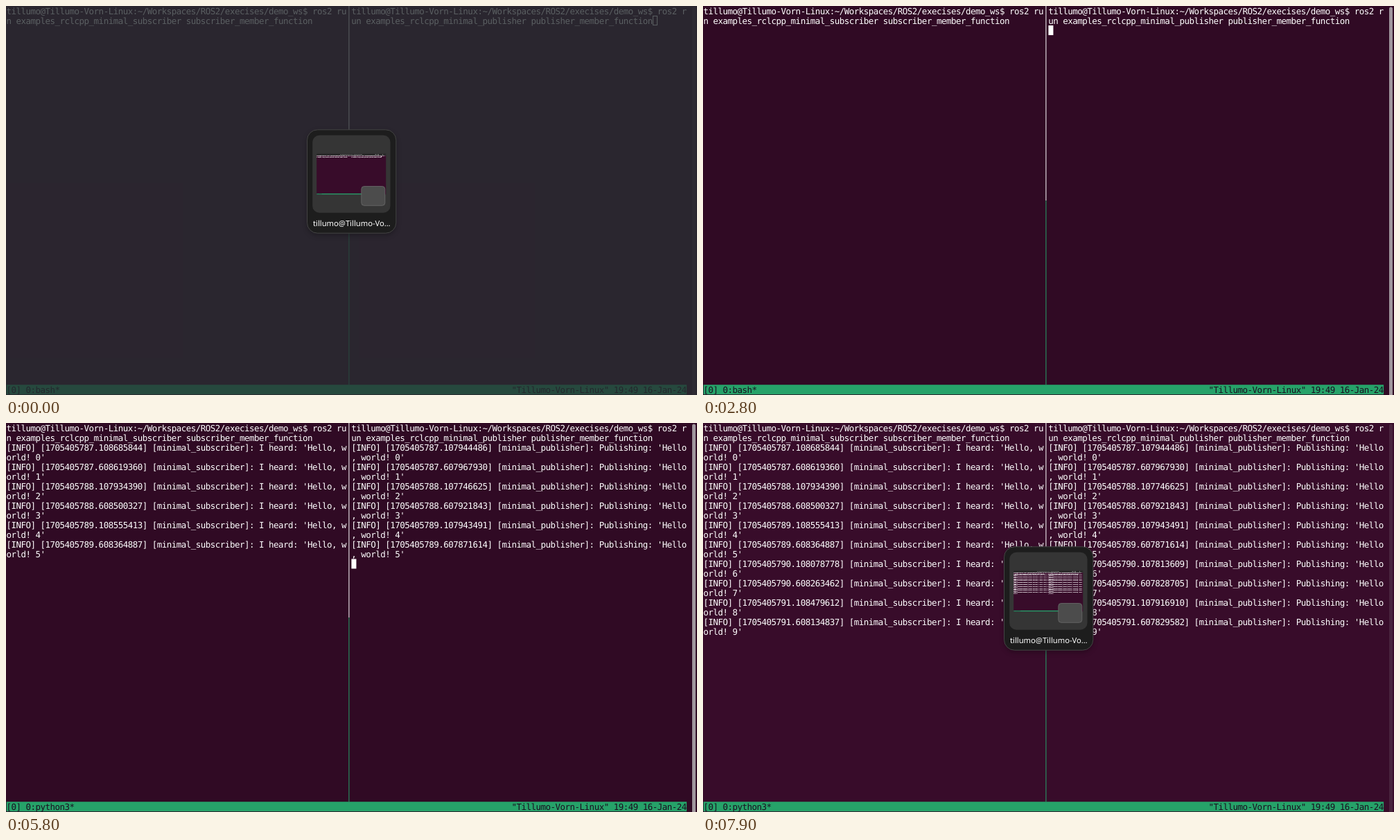
Write an HTML page that moves like this. It is 997 by 562 pixels and loops after 8000 ms.

```html
<!DOCTYPE html>
<html lang="en">
<head>
<meta charset="utf-8">
<title>Terminal publisher and subscriber</title>
<style>
html, body { margin: 0; width: 100%; height: 100%; overflow: hidden; background: #300a24; }
svg { display: block; width: 997px; height: 562px; }
text { white-space: pre; text-rendering: geometricPrecision; }
#term text { font: 12.5px "DejaVu Sans Mono", monospace; letter-spacing: -.516px; fill: #fff; }
#term .bar { fill: #1a1020; stroke: none; }
#label { font: 11.2px "Noto Sans", sans-serif; fill: #fff; }
#caption { font: 1.4px "Noto Sans", sans-serif; fill: #fff; }
#panel { filter: drop-shadow(0 3px 3px rgba(0, 0, 0, .25)); }
</style>
</head>
<body>
<svg viewBox="0 0 997 562">
  <rect width="997" height="562" fill="#272e31"/>
  <g id="fade">
    <g id="term">
      <rect id="back" width="997" height="562" stroke="none"/>
      <rect x=".7" y="547.2" width="981.4" height="14" fill="#26a269" stroke="none"/>
      <g id="rows"></g>
      <rect id="cursor"/>
    </g>
    <rect x="494.4" width="1" height="281" fill="#fff"/>
    <rect x="494.4" y="281" width="1" height="266.2" fill="#26a269"/>
    <rect id="scroll" x="990" y="1.5" width="5" height="570" rx="2.5"/>
  </g>
  <g id="popup">
    <rect id="panel" x="434.5" y="178.8" width="128.3" height="149.4" rx="15" fill="#1d1d1d" stroke="#444"/>
    <rect x="442.2" y="186.8" width="112.3" height="112" rx="10" fill="#353535"/>
    <rect x="448.2" y="212.8" width="100" height="4" rx="1" fill="#2b2b2b"/>
    <text id="caption" x="498" y="215.2" text-anchor="middle"></text>
    <path d="M532.5 214.5h2m1.5 0h2m5 0h1" stroke="#aaa" stroke-width=".8"/>
    <use href="#term" transform="translate(448.2 216) scale(.1003)" stroke="#fff" stroke-width="1.5"/>
    <rect x="512.8" y="260.5" width="34" height="27.8" rx="4" fill="#4c4c4c" stroke="#6c6c6c" stroke-width=".8"/>
    <text id="label" x="443" y="317.6"></text>
  </g>
</svg>
<script>
const LOOP = 8000, CW = 7.01, RH = 14.03, X0 = 0.7, RIGHT = 71;
const USER = "tillumo", HOST = "Tillumo-Vorn-Linux";
const $ = id => document.getElementById(id);
const colX = c => X0 + c * CW;
const rowY = r => r * RH;

const arrivals = [3300, 3800, 4300, 4800, 5300, 5800, 6300, 6900, 7300, 7800];
const heard = ["108685844", "608619360", "107934390", "608500327", "108555413",
  "608364887", "108078778", "608263462", "108479612", "608134837"];
const sent = ["107944486", "607967930", "107746625", "607921843", "107943491",
  "607871614", "107813609", "607828705", "107916910", "607829582"];

function addText(str, col, row, cls = "") {
  const el = document.createElementNS("http://www.w3.org/2000/svg", "text");
  el.setAttribute("x", colX(col) - 0.26);
  el.setAttribute("y", rowY(row) + 11.6);
  el.setAttribute("class", cls);
  el.textContent = str;
  $("rows").append(el);
  return el;
}

// Break a line at the pane's width, as a terminal does.
const wrap = (str, col, row, width) =>
  [addText(str.slice(0, width), col, row), addText(str.slice(width), col, row + 1)];

const left = (str, row) => wrap(str, 0, row, 70);
const right = (str, row) => wrap(str, RIGHT, row, 69);

const prompt = `${USER}@${HOST}:~/Workspaces/ROS2/execises/demo_ws$ `;
const run = role => `${prompt}ros2 run examples_rclcpp_minimal_${role} ${role}_member_function`;
left(run("subscriber"), 0);
right(run("publisher"), 0);

const logs = arrivals.map((_, i) => {
  const sec = 1705405787 + (i >> 1), row = 2 + 2 * i;
  return [
    ...left(`[INFO] [${sec}.${heard[i]}] [minimal_subscriber]: I heard: 'Hello, world! ${i}'`, row),
    ...right(`[INFO] [${sec}.${sent[i]}] [minimal_publisher]: Publishing: 'Hello, world! ${i}'`, row)
  ];
});

const job = addText("", 0, 39, "bar");
const clock = `"${HOST}" 19:49 16-Jan-24`;
addText(clock, 140 - clock.length, 39, "bar");
$("label").textContent = `${USER}@${HOST.slice(0, 10)}…`;
$("caption").textContent = `${USER}@${HOST}: ~/Workspaces/ROS2`;

const within = (t, spans) => spans.some(([a, b]) => t >= a && t < b);
const popupOn = [[0, 1000], [6400, 6700], [7300, LOOP]];
const unfocused = [[0, 1000], [6300, 6700], [7200, LOOP]];
const blinkOff = [[1500, 2100], [2700, 2800], [3900, 4500], [5100, 5700]];

function set(id, attrs) {
  for (const k in attrs) $(id).setAttribute(k, attrs[k]);
}

function draw(t) {
  const count = arrivals.filter(a => t >= a).length;
  const away = within(t, unfocused);
  const entered = t >= 2800;
  const inset = away ? 0.5 : 0;

  logs.forEach((group, i) => group.forEach(el => el.setAttribute("visibility", i < count ? "inherit" : "hidden")));
  job.textContent = count ? "[0] 0:python3*" : "[0] 0:bash*";

  set("fade", { opacity: t < 100 ? 0.23 : 1 });
  set("back", { fill: away ? "#380c2a" : "#300a24" });
  set("scroll", { fill: away ? "#48243d" : "#a0969d" });
  set("popup", { visibility: within(t, popupOn) ? "visible" : "hidden" });
  set("cursor", {
    x: colX(entered ? RIGHT : RIGHT + 62) + inset,
    y: rowY(entered ? 2 + 2 * count : 1) + inset,
    width: CW - 2 * inset,
    height: RH - 2 * inset,
    fill: away ? "none" : "#fff",
    stroke: away ? "#fff" : "none",
    "stroke-width": 1,
    visibility: within(t, blinkOff) ? "hidden" : "inherit"
  });
}

const start = performance.now();
function tick() {
  draw((performance.now() - start) % LOOP);
  requestAnimationFrame(tick);
}
draw(0);
requestAnimationFrame(tick);
</script>
</body>
</html>
```
